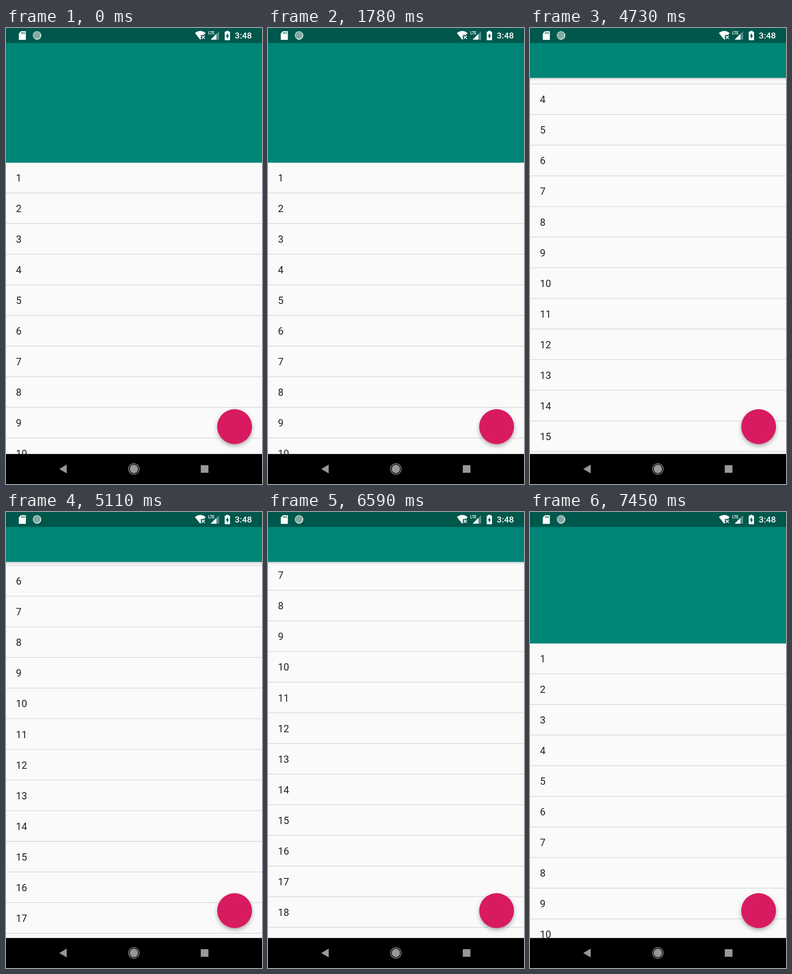
Write an HTML page with a canvas that moves like this. It is 561 px wide and 998 px high and loops after 8000 ms.

```html
<!DOCTYPE html>
<html lang="en">
<head>
<meta charset="utf-8">
<title>Collapsing header list</title>
<style>
html, body { margin: 0; width: 100%; height: 100%; overflow: hidden; background: #000; }
canvas { display: block; width: 561px; height: 998px; }
</style>
</head>
<body>
<canvas id="stage" width="561" height="998"></canvas>
<script>
const ctx = document.getElementById('stage').getContext('2d');
const W = 561, LOOP = 8000;
const HEADER = 294.8, HEADER_MIN = 109.2, STATUS = 32.7, NAV_TOP = 932.5;
const PITCH = 67.05, LINE = 1.56, ITEMS = 20;

const linear = p => p;
const easeIn = k => p => Math.pow(p, k);
const easeOut = k => p => 1 - Math.pow(1 - p, k);

// Scroll moves; each begins with a jump to `from` and advances in equal steps.
const moves = [
  { start: 4380, end: 5110, from: 46, to: 512, steps: 17, ease: easeOut(1.9) },
  { start: 5590, end: 5680, from: 550, to: 702, steps: 2, ease: linear },
  { start: 6460, end: 6590, from: 697, to: 592, steps: 3, ease: easeIn(1.7) },
  { start: 6590, end: 7190, from: 592, to: 37, steps: 14, ease: easeOut(1.61) },
  { start: 7280, end: 7450, from: 31, to: 7, steps: 4, ease: linear }
];

function scrollAt(t) {
  const m = moves.filter(m => t >= m.start).pop();
  if (!m) return 0;
  const stepLength = (m.end - m.start) / m.steps;
  const step = Math.min(m.steps, Math.floor((t - m.start + 10) / stepLength));
  return m.from + (m.to - m.from) * m.ease(step / m.steps);
}

function rect(x, y, w, h, color) {
  ctx.fillStyle = color;
  ctx.fillRect(x, y, w, h);
}

function circle(x, y, r, color) {
  ctx.fillStyle = color;
  ctx.beginPath();
  ctx.arc(x, y, r, 0, Math.PI * 2);
  ctx.fill();
}

function poly(points, color) {
  ctx.fillStyle = color;
  ctx.beginPath();
  points.forEach(([x, y]) => ctx.lineTo(x, y));
  ctx.closePath();
  ctx.fill();
}

function roundRect(x, y, w, h, r, color) {
  ctx.fillStyle = color;
  ctx.beginPath();
  ctx.roundRect(x, y, w, h, r);
  ctx.fill();
}

function text(str, x, y, font, color) {
  ctx.font = font + ' Roboto, sans-serif';
  ctx.fillStyle = color;
  ctx.fillText(str, x, y);
}

function drawList(scroll) {
  rect(0, 0, W, NAV_TOP, '#fafafa');
  for (let i = 0; i < ITEMS; i++) {
    const top = HEADER + i * PITCH - scroll;
    if (top > NAV_TOP || top + PITCH < HEADER_MIN) continue;
    text(i + 1, 21.8, top + 41.2, '21.8px', 'rgba(0,0,0,.87)');
    if (i < ITEMS - 1) rect(0, top + PITCH - LINE, W, LINE, '#d9d9dc');
  }
}

function drawHeader(scroll) {
  const bottom = Math.max(HEADER_MIN, HEADER - scroll);
  if (bottom === HEADER_MIN) {
    const g = ctx.createLinearGradient(0, bottom, 0, bottom + 7);
    g.addColorStop(0, 'rgba(0,0,0,.2)');
    g.addColorStop(0.4, 'rgba(0,0,0,.07)');
    g.addColorStop(1, 'rgba(0,0,0,0)');
    rect(0, bottom, W, 7, g);
  }
  rect(0, 0, W, bottom, '#008577');
}

function drawFab() {
  ctx.save();
  ctx.shadowColor = 'rgba(0,0,0,.32)';
  ctx.shadowBlur = 10;
  ctx.shadowOffsetY = 4;
  circle(501, 872.5, 38.2, '#d81b60');
  ctx.restore();
}

function drawStatus() {
  const bg = '#00574b';
  rect(0, 0, W, STATUS, bg);

  // memory card
  poly([[33, 7], [43.5, 7], [43.5, 26], [28, 26], [28, 12]], '#fff');
  for (let i = 0; i < 3; i++) rect(33.2 + i * 3.2, 9, 1.5, 4, bg);

  // progress disc
  circle(68, 16.2, 9.2, '#7fa9a2');
  ctx.strokeStyle = '#dce9e6';
  ctx.lineWidth = 1.7;
  ctx.setLineDash([1.5, 1.2]);
  ctx.beginPath();
  ctx.arc(68, 16.2, 8.4, 0, Math.PI * 2);
  ctx.stroke();
  ctx.setLineDash([]);
  ctx.beginPath();
  ctx.arc(68, 16.2, 8.2, -0.5, 2.1);
  ctx.stroke();

  // wifi
  ctx.fillStyle = '#fff';
  ctx.beginPath();
  ctx.moveTo(414, 11);
  ctx.quadraticCurveTo(425.7, 2.2, 437.4, 11);
  ctx.lineTo(425.7, 25.8);
  ctx.closePath();
  ctx.fill();
  rect(427, 15.2, 11, 11, bg);
  ctx.strokeStyle = '#fff';
  ctx.lineWidth = 1.8;
  ctx.beginPath();
  ctx.moveTo(428.8, 17); ctx.lineTo(435.6, 23.8);
  ctx.moveTo(435.6, 17); ctx.lineTo(428.8, 23.8);
  ctx.stroke();

  // mobile signal
  poly([[467, 7], [467, 25.5], [448.5, 25.5]], '#58908a');
  poly([[461, 13], [461, 25.5], [448.5, 25.5]], '#fff');
  rect(443, 5, 14, 10.5, bg);
  text('LTE', 443.2, 14.4, '700 8.4px', '#fff');

  // battery
  roundRect(479.3, 8, 11.6, 18.8, 1.2, '#fff');
  rect(482.4, 6.2, 5.4, 2.5, '#fff');
  poly([[486.2, 10.8], [481.6, 18.6], [484.4, 18.6], [484.4, 24], [488.8, 16.2], [486.2, 16.2]], bg);

  text('3:48', 501.3, 23.4, '500 19.1px', '#fff');
}

function drawNav() {
  const gray = '#989898';
  rect(0, NAV_TOP, W, 998 - NAV_TOP, '#000');
  poly([[116.8, 965.2], [133, 955.6], [133, 974.8]], gray);
  circle(280.2, 965, 9.2, gray);
  ctx.strokeStyle = gray;
  ctx.lineWidth = 1.5;
  ctx.beginPath();
  ctx.arc(280.2, 965, 11.6, 0, Math.PI * 2);
  ctx.stroke();
  roundRect(426.8, 956.8, 16.8, 16.8, 1.2, gray);
}

function draw(t) {
  const scroll = scrollAt(t);
  drawList(scroll);
  drawHeader(scroll);
  drawFab();
  drawStatus();
  drawNav();
}

const begin = performance.now();
function tick() {
  draw((performance.now() - begin) % LOOP);
  requestAnimationFrame(tick);
}
tick();
</script>
</body>
</html>
```
